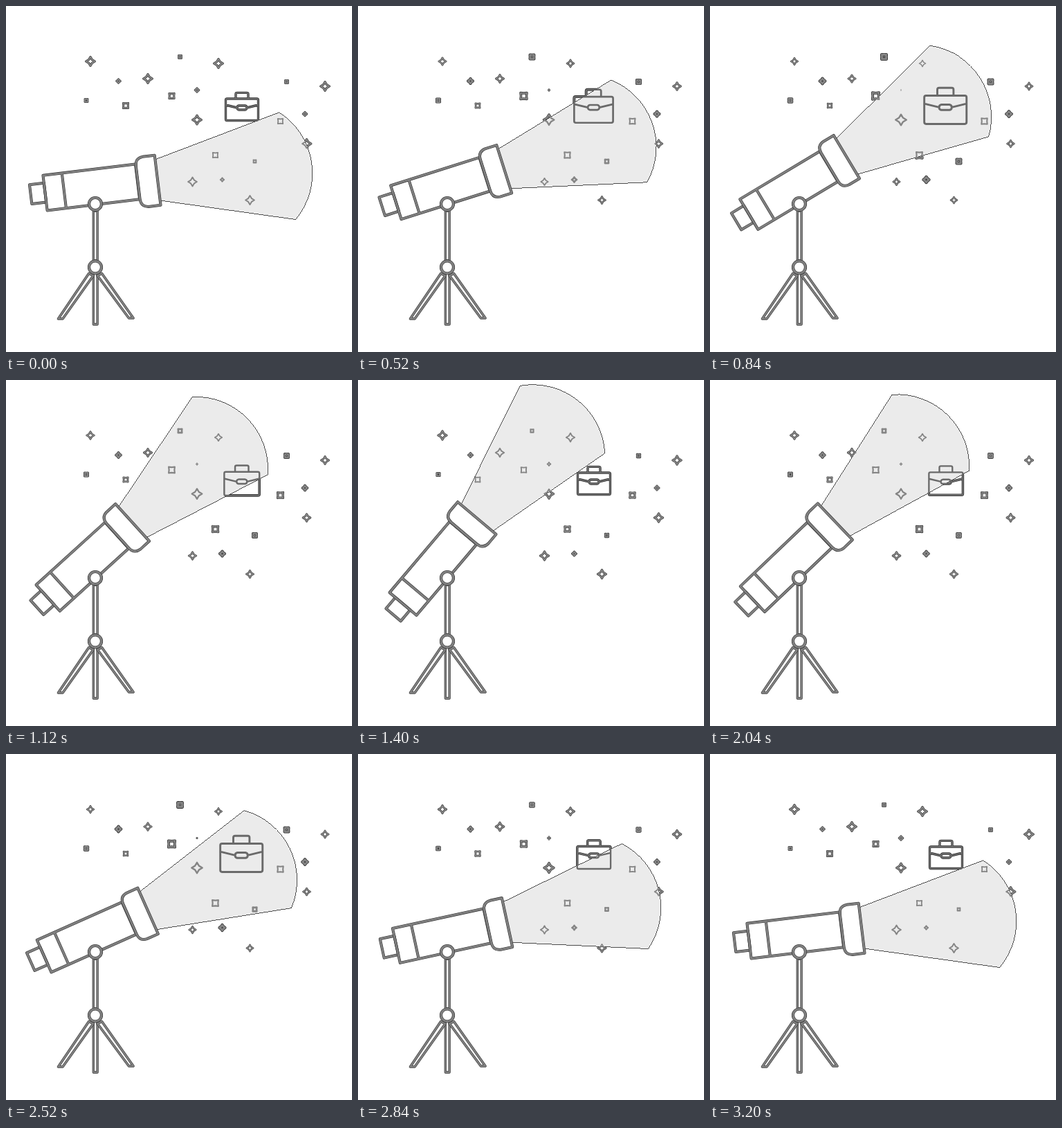
An HTML page that plays this animation: 500x500 px, repeating every 3.24 s.

```html
<!DOCTYPE html>
<html lang="en">
<head>
<meta charset="utf-8">
<title>Telescope</title>
<style>
  html, body { margin: 0; width: 100%; height: 100%; overflow: hidden; background: #fff; }
  svg { display: block; width: 100vw; height: 100vh; }
  path { fill: none; }
</style>
</head>
<body>
<svg id="stage" viewBox="0 0 500 500"></svg>
<script>
const LOOP = 3240, SWING = 3200, STEP = 40;
const PIVOT = [129, 286];
const EDGE = '#2b2b2b', GRAY = '#808080';

const stage = document.getElementById('stage');

function add(parent, tag, attrs = {}) {
  const el = document.createElementNS('http://www.w3.org/2000/svg', tag);
  for (const name in attrs) el.setAttribute(name, attrs[name]);
  parent.appendChild(el);
  return el;
}

const group = parent => add(parent, 'g');
const line = (parent, d, stroke, width) =>
  add(parent, 'path', { d, stroke, 'stroke-width': width, 'stroke-linejoin': 'round' });

// A gray line with a thin dark rim
function rimmed(parent, d, width = 2.9) {
  line(parent, d, EDGE, width + 1.1);
  line(parent, d, GRAY, width);
}

const rect = (x1, y1, x2, y2) => `M${x1},${y1}H${x2}V${y2}H${x1}Z`;

function starPath(radius, waist, turn) {
  const points = Array.from({ length: 8 }, (_, i) => {
    const a = turn + i * Math.PI / 4;
    const r = i % 2 ? radius * waist : radius;
    return (r * Math.cos(a)).toFixed(2) + ',' + (r * Math.sin(a)).toFixed(2);
  });
  return 'M' + points.join('L') + 'Z';
}

// Rims lie behind the beam, so lit objects show only their gray lines
const rims = group(stage);
const beam = group(stage);
const cores = group(stage);
const scope = group(stage);
const tripod = group(stage);

function litObject(d, width, color) {
  const parts = [group(rims), group(cores)];
  line(parts[0], d, EDGE, width + 1.1);
  line(parts[1], d, color, width);
  return (x, y, scale) => {
    for (const part of parts)
      part.setAttribute('transform', `translate(${x} ${y}) scale(${scale.toFixed(4)})`);
  };
}

const KINDS = {
  A: [starPath(6.4, 0.53, 0), 2],
  a: [starPath(2.7, 0.58, 0), 2],
  B: [starPath(5.2, 0.62, Math.PI / 4), 1.8],
  b: [starPath(2.8, 0.65, Math.PI / 4), 1.9]
};

// x, y, kind, scale at the height of the twinkle
const stars = [
  [122, 80, 'A', 0.75], [205, 105, 'A', 0.82], [307, 83, 'A', 0.72],
  [276, 164.5, 'A', 1.22], [461, 116, 'A', 0.8], [434.5, 199, 'A', 0.78],
  [269.5, 254, 'A', 0.75], [352.5, 280.5, 'A', 0.72],
  [162.5, 108.5, 'a', 1.4], [276, 121.5, 'a', 0.35],
  [432, 156, 'a', 1.4], [312.5, 251, 'a', 1.45],
  [251.5, 73.5, 'b', 1.6], [116, 136.5, 'b', 1.25],
  [405.5, 109.5, 'b', 1.45], [359.5, 224.5, 'b', 1.45],
  [173, 144, 'B', 0.82], [239.5, 130, 'B', 1.3],
  [396.5, 166.5, 'B', 1.15], [302.5, 215.5, 'B', 1.2]
].map(([x, y, kind, peak]) => {
  const place = litObject(...KINDS[kind], '#858585');
  return twinkle => place(x, y, 1 + (peak - 1) * twinkle);
});

const placeCase = litObject(
  'M-21.5,-15H21.5Q23.5,-15 23.5,-13V14.5Q23.5,16.5 21.5,16.5H-21.5Q-23.5,16.5 -23.5,14.5V-13Q-23.5,-15 -21.5,-15Z' +
  'M-9,-15V-21.8Q-9,-23.6 -7,-23.6H7Q9,-23.6 9,-21.8V-15' +
  'M-23.5,-6L-7,-2M23.5,-6L7,-2' +
  'M-4.5,-5H4.5Q7,-4.5 7,-2T4.5,1H-4.5Q-7,.5 -7,-2T-4.5,-5Z',
  2.25, '#6a6a6a');

add(beam, 'path', {
  d: 'M94.5,-53.4L279.8,-99.1A104.3,104.3 0 0 1 284.7,57.4L94.5,6.6',
  style: 'fill:#ebebeb', stroke: '#222', 'stroke-width': 0.8,
  'shape-rendering': 'crispEdges'
});

rimmed(scope, rect(-91, -39, -70, -11));
rimmed(scope, rect(-70, -50, 64.5, 1) + 'M-42.5,-50V1');
rimmed(scope, 'M93.6,-59.4H76Q65,-58.4 65,-47V1Q65,12 76,13.2H93.6Z');

rimmed(tripod, rect(126.3, 296, 132.1, 368), 2.2);
rimmed(tripod, rect(126.3, 386, 132.1, 460), 2.2);
rimmed(tripod, 'M119.7,386.5L75.5,452H82L126.3,389.5Z', 2.5);
rimmed(tripod, 'M138.5,386.5L184,451H177.5L132.1,389.5Z', 2.5);
for (const cy of [286, 377.5]) {
  const ring = { cx: 129, cy, r: 9 };
  add(tripod, 'circle', { ...ring, fill: '#fff', stroke: EDGE, 'stroke-width': 4.2 });
  add(tripod, 'circle', { ...ring, fill: 'none', stroke: GRAY, 'stroke-width': 3.1 });
}

const wave = (t, period) => (1 - Math.cos(2 * Math.PI * t / period)) / 2;

function ease(t, from, to) {
  const p = Math.min(1, Math.max(0, (t - from) / (to - from)));
  return (1 - Math.cos(Math.PI * p)) / 2;
}

function draw(t) {
  const angle = -6.95 - 44.5 * wave(t, SWING);
  const turn = `translate(${PIVOT}) rotate(${angle.toFixed(3)})`;
  beam.setAttribute('transform', turn);
  scope.setAttribute('transform', turn);

  const twinkle = wave(t, SWING / 2);
  stars.forEach(update => update(twinkle));

  // The case swells on the way up and again on the way back
  const half = Math.min(t, SWING - t);
  const swell = ease(half, 280, 680) - ease(half, 860, 1260);
  placeCase(341 - 0.8 * swell, 149, 1 + 0.3 * swell);
}

const start = performance.now();
function tick() {
  const t = (performance.now() - start) % LOOP;
  draw(Math.floor(t / STEP) * STEP);
  requestAnimationFrame(tick);
}
draw(0);
requestAnimationFrame(tick);
</script>
</body>
</html>
```
